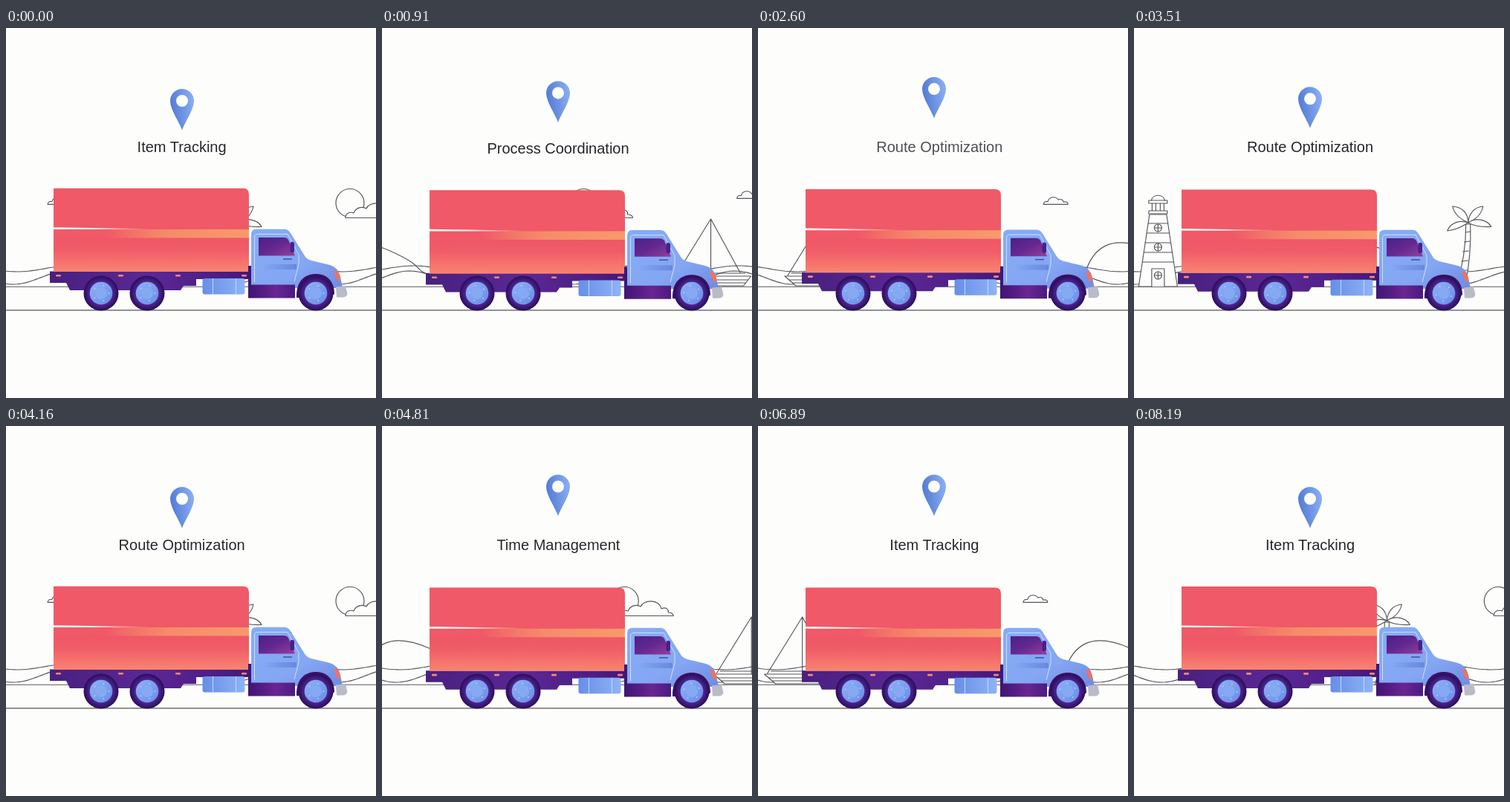
Animation, 498 px wide and 498 px high, one loop 8.32 s. Source, as an HTML page:

```html
<!DOCTYPE html>
<html lang="en">
<head>
<meta charset="utf-8">
<title>Delivery truck</title>
<style>
html, body { margin: 0; width: 100%; height: 100%; overflow: hidden; background: #fdfefc; }
svg { display: block; width: 100vw; height: 100vh; }
#label { font: 20px "Liberation Sans", Arial, sans-serif; fill: #25252a; text-anchor: middle; }
.line { fill: none; stroke: #55555b; stroke-width: 1.15; stroke-linejoin: round; stroke-linecap: round; }
.solid { fill: #fdfefc; }
</style>
</head>
<body>
<svg viewBox="0 0 498 498" xmlns="http://www.w3.org/2000/svg">
  <defs>
    <linearGradient id="pinFill" x1="0" y1="0.2" x2="1" y2="0">
      <stop offset="0" stop-color="#567cd4"/><stop offset="1" stop-color="#8db2f7"/>
    </linearGradient>
    <linearGradient id="lower" x1="0" y1="0" x2="0" y2="1">
      <stop offset="0" stop-color="#ef5766"/><stop offset=".35" stop-color="#f05c68"/><stop offset="1" stop-color="#f98470"/>
    </linearGradient>
    <linearGradient id="stripe">
      <stop offset="0" stop-color="#f79a6a" stop-opacity="0"/><stop offset=".45" stop-color="#f68c69"/><stop offset="1" stop-color="#f8996c"/>
    </linearGradient>
    <linearGradient id="shine">
      <stop offset="0" stop-color="#fff"/><stop offset=".4" stop-color="#fff" stop-opacity=".9"/><stop offset="1" stop-color="#fff" stop-opacity="0"/>
    </linearGradient>
    <linearGradient id="frame">
      <stop offset="0" stop-color="#48207f"/><stop offset=".5" stop-color="#5c2795"/><stop offset="1" stop-color="#45187b"/>
    </linearGradient>
    <linearGradient id="step">
      <stop offset="0" stop-color="#3f1473"/><stop offset=".6" stop-color="#6a2592"/><stop offset="1" stop-color="#4b1a80"/>
    </linearGradient>
    <linearGradient id="tank">
      <stop offset="0" stop-color="#668fe6"/><stop offset="1" stop-color="#8fb3f7"/>
    </linearGradient>
    <linearGradient id="cabFill" x1="0" y1="0" x2="1" y2="1">
      <stop offset="0" stop-color="#86acf6"/><stop offset=".6" stop-color="#84a6f3"/><stop offset="1" stop-color="#6f8ae0"/>
    </linearGradient>
    <linearGradient id="glass" x1="0" y1="0" x2="1" y2="1">
      <stop offset="0" stop-color="#4b1f86"/><stop offset=".5" stop-color="#642891"/><stop offset="1" stop-color="#963f9c"/>
    </linearGradient>
    <linearGradient id="glow">
      <stop offset="0" stop-color="#5c7fd8" stop-opacity="0"/><stop offset="1" stop-color="#5c7fd8" stop-opacity=".75"/>
    </linearGradient>
    <radialGradient id="tire">
      <stop offset=".65" stop-color="#4f2592"/><stop offset="1" stop-color="#2a0d58"/>
    </radialGradient>
    <linearGradient id="hub" x1="0" y1="0" x2="1" y2="1">
      <stop offset="0" stop-color="#8fb2f8"/><stop offset="1" stop-color="#688ce6"/>
    </linearGradient>
    <g id="wheel">
      <circle r="23.500" fill="url(#tire)"/>
      <circle r="15.300" fill="url(#hub)"/>
      <circle r="8" fill="#86a9f4"/>
      <g id="bolts" fill="#b4cdfb"></g>
    </g>
    <path id="cloud" class="line solid" d="M0 0C1-4 3-4 6-4C8-11 17-11 20-6C23-8 27-6 27-3C30-4 33-3 33 0Z"/>
    <g id="world" class="line"></g>
  </defs>

  <path class="line" d="M0 348.200H498"/>
  <g id="scene"><use href="#world"/><use id="next" href="#world"/></g>
  <path class="line" d="M0 379.800H498"/>

  <path id="pin" fill="url(#pinFill)" fill-rule="evenodd" d="M237 137.500C233 126 221 110 221 98A16 16 0 0 1 253 98C253 110 241 126 237 137.500ZM237 90A8 8 0 1 0 237 106A8 8 0 1 0 237 90Z"/>
  <text id="label" x="237"></text>

  <g id="load">
    <path fill="url(#frame)" d="M59 327.500H329V338H256V347H239L235 353H86L81 343H59Z"/>
    <g id="lamps" fill="#f78a72"></g>
    <path fill="#f05967" d="M64 215.800H319Q327 215.800 327 224V328H64Z"/>
    <path fill="url(#lower)" d="M64 282H327V328H64Z"/>
    <path fill="url(#stripe)" d="M135 271H327V282.500H135Z"/>
    <path fill="url(#shine)" d="M64 268.300L195 270.300V271H64Z"/>
    <rect x="264.500" y="337" width="57" height="21.500" rx="3" fill="url(#tank)"/>
    <path stroke="#c3d7fc" fill="none" d="M278.500 337V358M309.500 337V358"/>
  </g>

  <g id="cab">
    <path fill="url(#step)" d="M326 320H332V344H389V363.500H326Z"/>
    <path fill="url(#cabFill)" d="M330 345.500V278Q330 270.800 337 270.800H374Q380 270.800 383 276L401 305Q404 311 411 313L436 319Q447 322 450 335L453 350H389V345.500Z"/>
    <path fill="none" stroke="#cfe0ff" d="M334.500 342V282Q334.500 277.500 338.500 277.500H379L394 305V318L388 341"/>
    <path fill="url(#glass)" d="M340 282H375Q378 282 380 285L389 306.500H340Z"/>
    <rect x="382.500" y="288" width="5.500" height="14" rx="2" fill="#4a2088"/>
    <path stroke="#3f4fa2" stroke-width="1.500" d="M373 311H385"/>
    <rect x="345" y="318" width="46" height="7" fill="url(#glow)"/>
    <path fill="#f4705f" d="M441.500 327H446Q449.500 331 450.500 340H446Z"/>
    <path fill="#b9bbc6" d="M444 348.500L457 347L459.500 358Q458 362.500 453 362.500H445Z"/>
    <path fill="#38126b" d="M391 363C390 341 402 331 417 331S442 341 442 358L436 363Z"/>
  </g>
  <g id="wheels"></g>
</svg>
<script>
const STEP = 130, FRAMES = 64, BEAT = 16, LAP = 32;
const SPEED = 27.35, SPAN = SPEED * LAP;
const SWAP = 2.5; // moment in a beat when the label changes
const LABELS = [
  { text: "Item Tracking", y: 166.5 },
  { text: "Process Coordination", y: 168.8 },
  { text: "Route Optimization", y: 167 },
  { text: "Time Management", y: 166.5 },
];

const $ = id => document.getElementById(id);
const add = (parent, tag, attrs) => {
  const el = document.createElementNS("http://www.w3.org/2000/svg", tag);
  for (const k in attrs) el.setAttribute(k, attrs[k]);
  return parent.appendChild(el);
};
const world = $("world");
const draw = (d, solid) => add(world, "path", { d, class: solid ? "line solid" : "line" });
const shift = (el, x, y) => el.setAttribute("transform", `translate(${x} ${y})`);

// Six swells along one lap of scenery
function swell(level, height, trough) {
  let d = "";
  for (let x = 0; x <= SPAN; x += SPAN / 240) {
    const y = level + height * Math.cos(12 * Math.PI * (x - trough) / SPAN);
    d += (d ? "L" : "M") + x.toFixed(1) + " " + y.toFixed(1);
  }
  draw(d);
}

function hills() {
  draw("M108 347C118 290 150 277 200 299S235 325 250 330");
  swell(324, 4, 15);
  swell(336, 9, 10);
}

function sky() {
  add(world, "circle", { cx: 463, cy: 235.5, r: 19, class: "line" });
  draw("M457 255.500C457 249 463 247 468 249C471 241 480 240 485 243C488 234 509 232 513 246C519 243 523 247 522 251C526 251 529 253 529 255.500Z", true);
  for (const [x, y] of [[56, 237.3], [669, 229.3], [705, 269.5]])
    add(world, "use", { href: "#cloud", x, y });
}

function palm() {
  draw("M310 264C310 288 306 320 297 348H309C314 322 317 290 316 264Z", true);
  for (let i = 0; i < 6; i++) {
    const y = 275 + i * 13;
    draw(`M${309.5 - i * 1.8} ${y}L${316 - i * 1.1} ${y - 1}`);
  }
  draw("M313 262C313 249 305 241 292 240C294 250 302 257 313 262Z", true);
  draw("M313 262C314 250 321 241 333 240C331 250 325 257 313 262Z", true);
  draw("M313 262C302 258 289 262 285 273C296 272 304 268 313 262Z", true);
  draw("M313 262C322 255 338 257 344 267.500C332 268 321 267 313 262Z", true);
}

function boat() {
  draw("M583 334H688L678 347H598Z", true);
  draw("M589 339H684M594 343H681M592 330H680M634 334V257L587 333M634 257L674 330");
}

function lighthouse() {
  const cx = 770.8;
  const half = y => 11.5 + (y - 251) * 0.15;
  const bar = (y, w) => `M${cx - w} ${y}H${cx + w}`;
  draw(`${bar(251, half(251))}L${cx + half(348)} 348H${cx - half(348)}Z`, true);
  for (let y = 263; y < 320; y += 13) draw(bar(y, half(y)));
  for (const x of [-8, -3, 3, 8]) draw(`M${cx + x} 235V246`);
  for (const y of [232, 246]) draw(`${bar(y, 12.5)}v4H${cx - 12.5}Z`, true);
  draw(`M${cx - 9} 232C${cx - 7} 223 ${cx + 7} 223 ${cx + 9} 232`);
  draw(`M${cx - 8.5} 348V324H${cx + 8.5}V348`, true);
  for (const y of [269, 295, 333]) {
    add(world, "circle", { cx, cy: y, r: 5, class: "line solid" });
    draw(`${bar(y, 5)}M${cx} ${y - 5}v10`);
  }
}

[hills, sky, palm, boat, lighthouse].forEach(f => f());
shift($("next"), SPAN, 0);

for (const x of [67, 151, 228, 317]) add($("lamps"), "rect", { x, y: 332, width: 7, height: 2.6, rx: 1 });
for (let i = 0; i < 5; i++) {
  const a = i * Math.PI * 0.4;
  add($("bolts"), "circle", { cx: 10.5 * Math.cos(a), cy: 10.5 * Math.sin(a), r: 1 });
}
for (const x of [128, 190, 417]) add($("wheels"), "use", { href: "#wheel", x, y: 357 });

// Quick smooth lift, then a slow settle
function hop(phase) {
  const up = Math.min(1, phase / 4.5);
  const rest = 1 - Math.max(0, phase - 5) / 10;
  return -16.5 * up * up * (3 - 2 * up) * rest * rest;
}

function show(n) {
  const phase = n % BEAT;
  const bob = 1.3 * (1 - Math.cos(2 * Math.PI * phase / BEAT));
  shift($("scene"), -SPEED * (n % LAP), 0);
  shift($("load"), 0, bob);
  shift($("cab"), 0, bob / 2);
  shift($("pin"), 0, hop(phase));
  $("bolts").setAttribute("transform", `rotate(${n * 67.5})`);

  const away = phase - SWAP;
  const near = Math.max(0, 1 - Math.abs(away) / 2.8) ** 2;
  const { text, y } = LABELS[(Math.floor(n / BEAT) + (away > 0 ? 1 : 0)) % LABELS.length];
  const label = $("label");
  label.textContent = text;
  label.setAttribute("opacity", 1 - 0.9 * near);
  shift(label, Math.sign(away) * 34 * near, y);
}

const start = performance.now();
let last = -1;
function tick() {
  const n = Math.floor((performance.now() - start) / STEP) % FRAMES;
  if (n !== last) show(last = n);
  requestAnimationFrame(tick);
}
tick();
</script>
</body>
</html>
```
